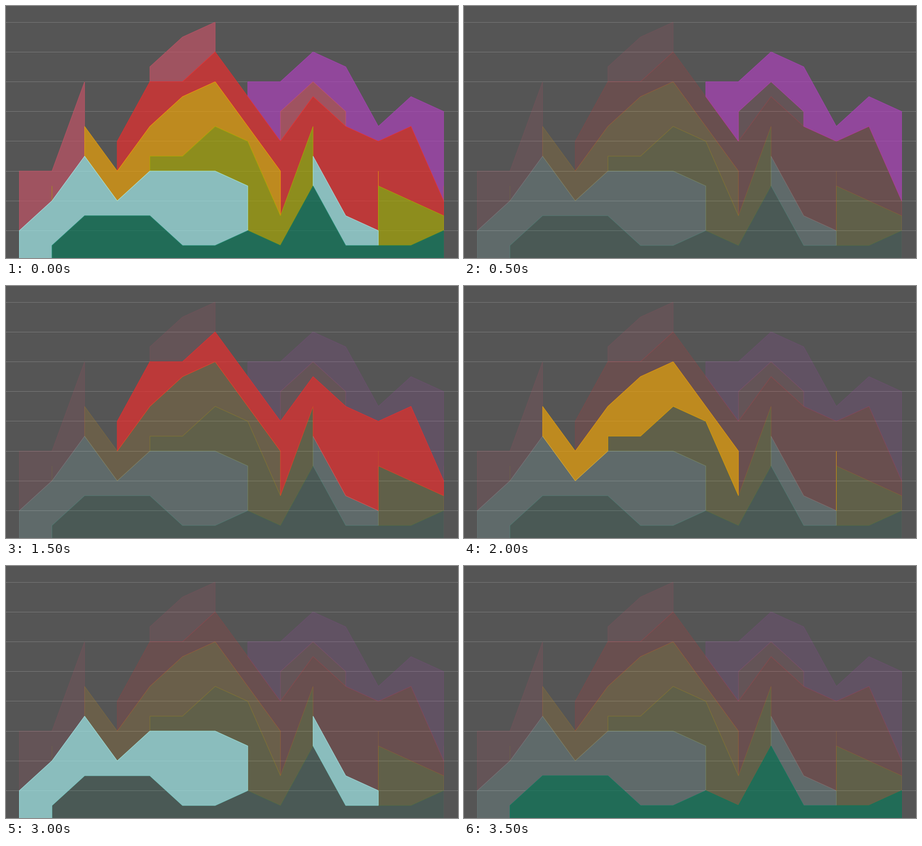
Animation, 865 px wide and 484 px high, one loop 4 s. Source, as a matplotlib script:

```python
import math

import matplotlib.pyplot as plt
from matplotlib.animation import FuncAnimation
from matplotlib.colors import to_rgba
from matplotlib.patches import Polygon

W, H, DPI = 865, 484, 100
PX = 72 / DPI
FILL, STROKE, DIM = 0.7, 0.8, 0.2
COLS = 14
X0, DX = 25.5, 812 / 13
BASE, UNIT = 488.6, 28.6

# Stacked from the ground up: colour, then runs of values by first column
series = [
    ("#0b7659", {1: [1, 3, 3, 3, 1, 1, 2, 1, 5, 1, 1, 1, 2]}),
    ("#a1eaea", {0: [2, 3, 4, 1, 3, 5, 5, 3], 9: [2, 2, 1]}),
    ("#a5a606", {1: [1], 4: [1, 1, 3, 3, 2, 2], 11: [3, 3, 1]}),
    ("#eba109", {2: [2, 2, 2, 4, 3, 1, 3], 11: [1]}),
    ("#e92e2e", {3: [2, 3, 1, 2, 2, 2, 2, 6, 2, 5, 1]}),
    ("#c05365", {0: [4, 1, 3], 4: [1, 3, 2], 8: [2, 1, 1], 13: [1]}),
    ("#ab42b9", {7: [1, 2, 2, 3, 1, 2, 5]}),
]


def y_at(value):
    return BASE - UNIT * value


def place(points):
    return [(X0 + DX * col, y_at(value)) for col, value in points]


totals = [0] * COLS
# Upper edge so far, as (left, right) heights between neighbouring columns
surface = [(0, 0)] * COLS


def stack(first, values):
    """Put one run on the stack and return its outline."""
    last = first + len(values) - 1
    for col, value in enumerate(values, first):
        totals[col] += value
    top = [(col, totals[col]) for col in range(first, last + 1)]
    floor = [(seg + side, surface[seg][side])
             for seg in range(first, last) for side in (0, 1)]
    # A lone value is a vertical line down to the lower neighbour
    floor = floor or [(first, min(surface[first - 1][1], surface[first][0]))]
    for seg in range(first, last):
        surface[seg] = totals[seg], totals[seg + 1]
    return place(top + floor[::-1])


fig = plt.figure(figsize=(W / DPI, H / DPI), dpi=DPI, facecolor="#555555")
ax = fig.add_axes([0, 0, 1, 1])
ax.set_xlim(0, W)
ax.set_ylim(H, 0)
ax.axis("off")

for value in range(2, 17, 2):
    row = math.floor(y_at(value) + 0.01) + 0.5
    ax.plot([0, W], [row, row], color="#999999", lw=PX, ls=(0, (1, 1)),
            dash_capstyle="butt", snap=False, zorder=1)

layers = []
for depth, (color, runs) in enumerate(series):
    group = [Polygon(stack(first, values), closed=True, lw=PX,
                     joinstyle="bevel", snap=False, zorder=10 - depth)
             for first, values in runs.items()]
    for shape in group:
        ax.add_patch(shape)
    layers.append((color, group))


def draw(step):
    """Show all layers, then spotlight each one from the top down."""
    active = len(layers) - step
    for i, (color, group) in enumerate(layers):
        strength = 1 if step == 0 or i == active else DIM
        for shape in group:
            shape.set_facecolor(to_rgba(color, FILL * strength))
            shape.set_edgecolor(to_rgba(color, STROKE * strength))
    return [shape for _, group in layers for shape in group]


anim = FuncAnimation(fig, draw, frames=len(series) + 1, interval=500,
                     repeat=True, repeat_delay=0)
plt.show()
```
